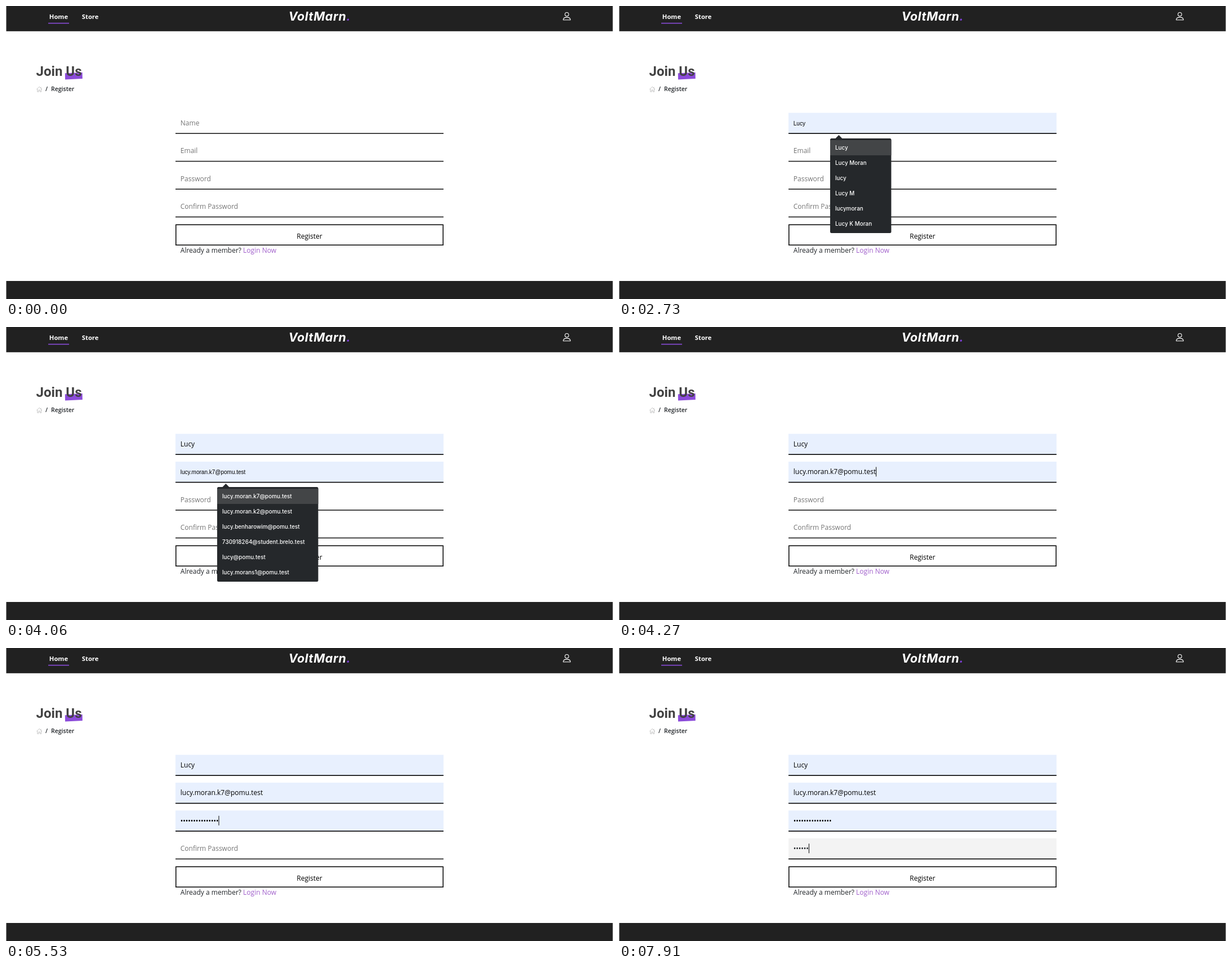
An HTML page for the animation above (8 s loop, 1078 by 520 pixels).

```html
<!DOCTYPE html>
<html lang="en">
<head>
<meta charset="utf-8">
<title>Register</title>
<style>
  html, body { margin: 0; width: 100%; height: 100%; overflow: hidden; background: #fff; }
  svg { display: block; width: 100%; height: 100%; }
  text { font: 12px "Open Sans", sans-serif; fill: #212529; white-space: pre; }
  .nav { font-size: 11.25px; font-weight: 700; fill: #fff; }
  .brand { font: italic 700 21.5px Inter, sans-serif; letter-spacing: .6px; fill: #fff; }
  .title { font: 600 24px Roboto, sans-serif; fill: #414141; }
  .crumb { font-size: 10.5px; font-weight: 600; }
  .idle { fill: #757575; }
  .fill { fill: #000; }
  .preview { font: 10px "Liberation Sans", Arial, sans-serif; fill: #000; }
  .item { font: 500 9.9px Inter, sans-serif; fill: #fff; }
  .muted { font-weight: 400; fill: #a3a6aa; }
</style>
</head>
<body>
<svg id="stage" viewBox="0 0 1078 520">
  <rect width="1078" height="520" fill="#fff"/>
  <g fill="#212121">
    <rect x=".5" width="1077" height="44.8"/>
    <rect x=".5" y="488" width="1077" height="32"/>
  </g>

  <text class="nav" x="76.8" y="23">Home</text>
  <text class="nav" x="134.8" y="23">Store</text>
  <rect x="75" y="29.8" width="37" height="1.6" fill="#8a4bdb"/>
  <text class="brand" x="557" y="26" text-anchor="middle">VoltMarn<tspan fill="#7d3fd6">.</tspan></text>
  <g fill="none" stroke="#fff" stroke-width="1.1">
    <circle cx="996" cy="14.8" r="3.3"/>
    <path d="M989.6 24.7c0-3 2.6-4.6 6.4-4.6s6.4 1.6 6.4 4.6z" stroke-linejoin="round"/>
  </g>

  <path d="M104.8 119.2 135.6 118 135.8 129 105 130.6z" fill="#8b4bd9"/>
  <text class="title" x="53.6" y="124">Join Us</text>
  <path d="M54.4 148 59.2 143.2 64 148M55.8 147v5.2h2.2v-3.2h2.4v3.2h2.2V147M62 145.800V143.800" fill="none" stroke="#b5b5b5" stroke-width=".8"/>
  <text class="crumb" x="70" y="151.3">/</text>
  <text class="crumb" x="80" y="151.3">Register</text>

  <g id="form"></g>
  <rect x="301.75" y="388.25" width="474.5" height="36" fill="#fff" stroke="#000" stroke-width="1.5"/>
  <text class="fill" x="539" y="413.2" text-anchor="middle">Register</text>
  <text x="309.8" y="438.2">Already a member? <tspan fill="#a05fcb">Login Now</tspan></text>
  <rect id="caret" width="1" height="17" fill="#000"/>
  <g id="popups"></g>
</svg>

<script>
const LOOP = 8000;
const $ = id => document.getElementById(id);

function add(parent, tag, attrs, text) {
  const el = document.createElementNS('http://www.w3.org/2000/svg', tag);
  for (const k in attrs) el.setAttribute(k, attrs[k]);
  if (text) el.textContent = text;
  parent.appendChild(el);
  return el;
}

const NAME = 'Lucy';
const EMAIL = 'lucy.moran.k7@pomu.test';
const dots = n => '•'.repeat(n);
const BG = { idle: '#fff', focus: '#f3f3f3', fill: '#e8f0fe', preview: '#e8f0fe' };

// Keys: [time, mode, value, caret]
const fields = [
  ['Name', [
    [910, 'focus', '', 1], [1400, 'focus', '', 0], [1960, 'focus', '', 1],
    [2170, 'focus', 'l', 1], [2520, 'preview', NAME, 0],
    [3290, 'fill', NAME, 1], [3500, 'fill', NAME, 0]]],
  ['Email', [
    [3500, 'focus', '', 1], [3920, 'preview', EMAIL, 0],
    [4270, 'fill', EMAIL, 1], [4620, 'fill', EMAIL, 0]]],
  ['Password', [
    [4620, 'focus', '', 1], [5040, 'preview', dots(15), 0],
    [5530, 'fill', dots(15), 1], [5810, 'fill', dots(15), 0]]],
  ['Confirm Password', [
    [5810, 'focus', '', 1], [6300, 'focus', '', 0], [6720, 'focus', '', 1],
    ...[6860, 7000, 7140, 7350, 7560, 7770].map((t, i) => [t, 'focus', dots(i + 1), 1])]]
].map(([label, keys], i) => {
  const y = 189.6 + i * 49.4;
  const form = $('form');
  return {
    label, keys, y,
    bg: add(form, 'rect', { x: 301, y, width: 476, height: 37 }),
    line: add(form, 'rect', { x: 301, y: y + 35.8, width: 476, height: 1.6 }),
    text: add(form, 'text', { x: 309.8, y: y + 22.400 })
  };
});

function popup(y, width, height, hoverHeight, [from, hover, to]) {
  const g = add($('popups'), 'g', {});
  add(g, 'path', { d: `M384 ${y + .5}l6.400-6.500 6.400 6.500z`, fill: '#25282b' });
  add(g, 'rect', { x: 375, y, width, height, rx: 2.5, fill: '#25282b' });
  const mark = add(g, 'rect', { x: 375, y: y + 3, width, height: hoverHeight, fill: '#434547' });
  return { g, mark, from, hover, to };
}

function listPopup(y, width, items, times) {
  const p = popup(y, width, items.length * 27 + 6, 27, times);
  items.forEach((s, i) => add(p.g, 'text', { class: 'item', x: 384, y: y + 20 + i * 27 }, s));
  return p;
}

function passwordPopup(y, times) {
  const p = popup(y, 170.5, 83.5, 46.500, times);
  add(p.g, 'circle', { cx: 390, cy: y + 24.500, r: 4.500, fill: 'none', stroke: '#b4b7ba' });
  add(p.g, 'path', { d: `M386.500 ${y + 22}l3 1 1 3-2 2.500zM391 ${y + 20.500}l3 3-1 2-2.500-2z`, fill: '#b4b7ba' });
  add(p.g, 'text', { class: 'item', x: 405, y: y + 20.500 }, EMAIL);
  add(p.g, 'path', {
    d: `M407.400 ${y + 34}h64.500`, stroke: '#b4b7ba', 'stroke-width': 1.8,
    'stroke-linecap': 'round', 'stroke-dasharray': '0 4.6'
  });
  add(p.g, 'rect', { x: 375, y: y + 49.500, width: 170.5, height: 1, fill: '#404347' });
  add(p.g, 'circle', { cx: 390, cy: y + 67, r: 5, fill: '#999c9f' });
  add(p.g, 'text', { class: 'item muted', x: 405, y: y + 70.800 }, 'Manage Passwords...');
  add(p.g, 'circle', { cx: 526, cy: y + 67, r: 4, fill: '#4a86e8' });
  return p;
}

const popups = [
  listPopup(235, 108.5,
    [NAME, 'Lucy Moran', 'lucy', 'Lucy M', 'lucymoran', 'Lucy K Moran'],
    [2240, 2520, 3290]),
  listPopup(284, 179.5,
    [EMAIL, 'lucy.moran.k2@pomu.test', 'lucy.benharowim@pomu.test',
      '730918264@student.brelo.test', 'lucy@pomu.test', 'lucy.morans1@pomu.test'],
    [3570, 3920, 4270]),
  passwordPopup(333, [4690, 5040, 5530])
];

const show = (el, on) => el.setAttribute('visibility', on ? 'inherit' : 'hidden');

function draw(t) {
  const caret = $('caret');
  show(caret, false);
  for (const f of fields) {
    const key = f.keys.filter(k => k[0] <= t).pop() || [0, 'idle', '', 0];
    const [, mode, value, caretOn] = key;
    f.bg.setAttribute('fill', BG[mode]);
    f.line.setAttribute('fill', mode === 'idle' ? '#1c1c1c' : '#000');
    f.text.setAttribute('class', value ? mode : 'idle');
    f.text.textContent = value || f.label;
    if (caretOn) {
      caret.setAttribute('x', 309.8 + (value ? f.text.getComputedTextLength() : 0));
      caret.setAttribute('y', f.y + 9.4);
      show(caret, true);
    }
  }
  for (const p of popups) {
    show(p.g, t >= p.from && t < p.to);
    show(p.mark, t >= p.hover && t < p.to);
  }
}

const start = performance.now();
function tick() {
  draw((performance.now() - start) % LOOP);
  requestAnimationFrame(tick);
}
tick();
</script>
</body>
</html>
```
